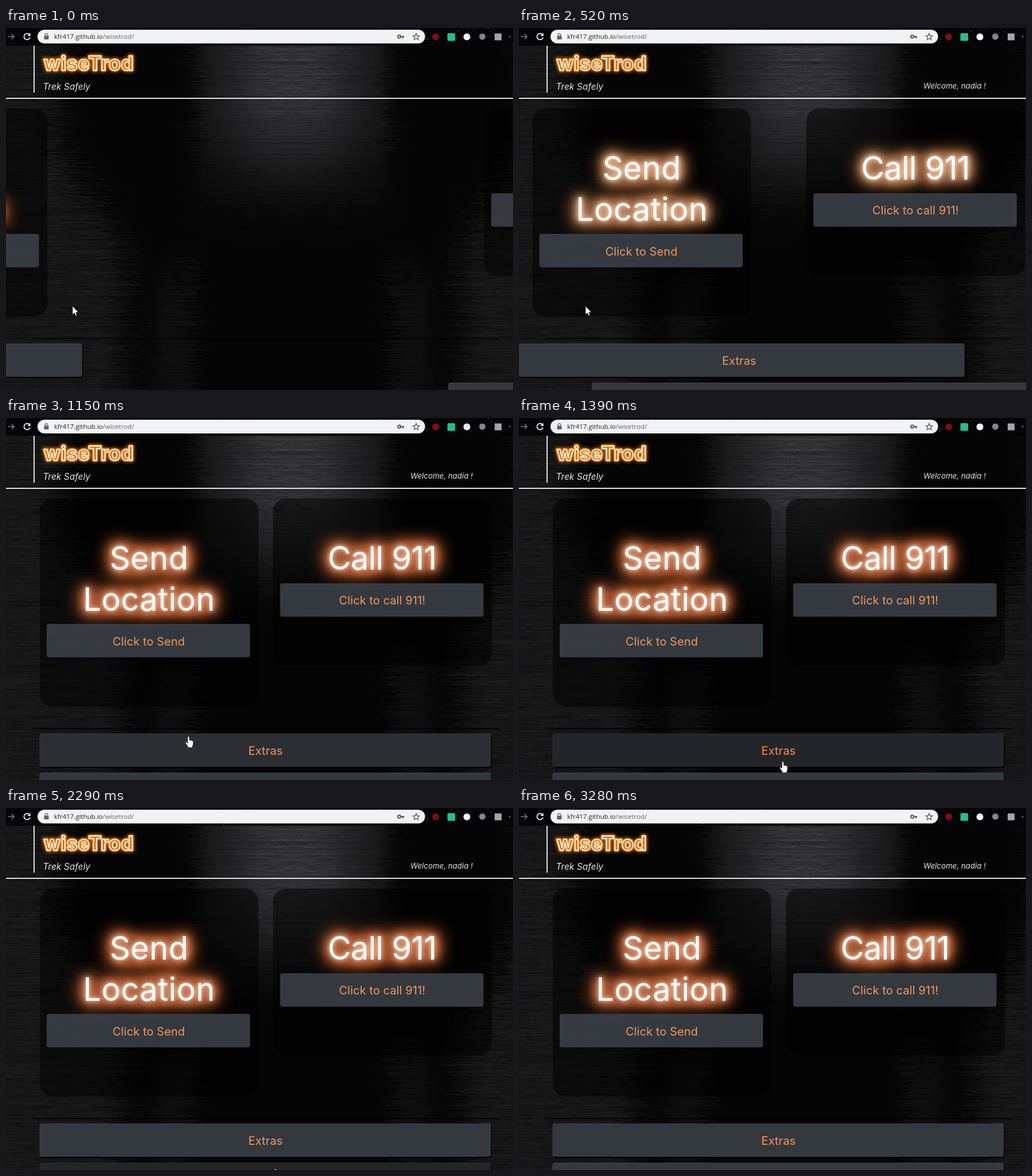
An HTML page with a canvas for the animation above (3380 ms loop, 885 by 633 pixels).

```html
<!DOCTYPE html>
<html lang="en">
<head>
<meta charset="utf-8">
<title>wiseTrod</title>
<style>
html, body { margin: 0; width: 100%; height: 100%; overflow: hidden; background: #050505; }
canvas, svg { position: absolute; left: 0; top: 0; width: 885px; height: 633px; display: block; }
text { font-family: Inter, sans-serif; font-optical-sizing: none; }
.big { font-size: 56px; letter-spacing: .3px; fill: #fff; text-anchor: middle; }
.tight { letter-spacing: -.7px; }
.btn { font-size: 20px; letter-spacing: .1px; fill: #f4965f; text-anchor: middle; }
.note { font-style: italic; fill: #e6e6e6; }
.logo { font-size: 34px; font-weight: 700; letter-spacing: .8px; stroke-linejoin: round; }
.url { font: 11.5px "Open Sans", sans-serif; fill: #202124; }
.box { fill: rgb(61,67,74); fill-opacity: .85; }
.card { fill: #000; fill-opacity: .52; }
</style>
</head>
<body>
<canvas id="metal" width="885" height="633"></canvas>
<svg viewBox="0 0 885 633" xmlns="http://www.w3.org/2000/svg">
  <defs>
    <filter id="neon" x="-.5" y="-1" width="2" height="3" color-interpolation-filters="sRGB">
      <feGaussianBlur in="SourceAlpha" stdDeviation="17"/>
      <feColorMatrix id="outer" result="a"/>
      <feGaussianBlur in="SourceAlpha" stdDeviation="9"/>
      <feColorMatrix id="mid" result="b"/>
      <feGaussianBlur in="SourceAlpha" stdDeviation="3.5"/>
      <feColorMatrix id="inner" result="c"/>
      <feMerge>
        <feMergeNode in="a"/><feMergeNode in="b"/><feMergeNode in="c"/><feMergeNode in="SourceGraphic"/>
      </feMerge>
    </filter>
    <filter id="soft" x="-.2" y="-.5" width="1.4" height="2"><feGaussianBlur stdDeviation="2.5"/></filter>
  </defs>

  <!-- browser bar -->
  <path d="M3 15H14M9.5 10.5L14 15L9.5 19.5" fill="none" stroke="#77787c" stroke-width="1.6"/>
  <path d="M41 11.5A5.4 5.4 0 1 0 42 16.5" fill="none" stroke="#f1f1f1" stroke-width="1.8"/>
  <path d="M42.6 8.6V14H37.2Z" fill="#f1f1f1"/>
  <rect x="55" y="3" width="676.5" height="24" rx="12" fill="#f1f2f5"/>
  <rect x="66.5" y="13.5" width="8" height="6.5" rx="1" fill="#5f6368"/>
  <path d="M68.2 14V12a2.3 2.3 0 0 1 4.6 0V14" fill="none" stroke="#5f6368" stroke-width="1.3"/>
  <text class="url" x="84" y="19.3">kfr417.github.io<tspan fill="#5f6368">/wisetrod/</tspan></text>
  <circle cx="686.5" cy="15" r="2.6" fill="none" stroke="#55585d" stroke-width="2"/>
  <path d="M689 15H695M693 15V18" stroke="#55585d" stroke-width="2.2"/>
  <path id="star" fill="none" stroke="#55585d" stroke-width="1.3"/>
  <circle cx="750" cy="15.5" r="6" fill="#7f0f13"/>
  <rect x="770.5" y="9" width="13.5" height="13.5" rx="2" fill="#21c08d"/>
  <circle cx="804.5" cy="15.5" r="6" fill="#f4f4f4"/>
  <circle cx="831.5" cy="15" r="5.5" fill="#858585"/>
  <rect x="853" y="9.5" width="12" height="12" fill="#a5a5a5"/>
  <circle cx="879" cy="15" r="1" fill="#c8c8c8"/>

  <!-- page header -->
  <path d="M49 31V113M0 123H885" stroke="#e2e2e2" stroke-width="2"/>
  <g class="logo">
    <text x="66" y="74" fill="#e07a18" stroke="#e07a18" stroke-width="7" opacity=".75" filter="url(#soft)">wiseTrod</text>
    <text x="66" y="74" fill="#b5651c" stroke="#e8862a" stroke-width="4.6">wiseTrod</text>
    <text x="66" y="74" fill="#c9762a" stroke="#fff0d6" stroke-width="2">wiseTrod</text>
  </g>
  <text class="note" x="64.5" y="108" font-size="15.2" letter-spacing=".15">Trek Safely</text>
  <text class="note" id="hello" x="706" y="106" font-size="13.3">Welcome, nadia !</text>

  <!-- sliding panels -->
  <g id="left">
    <rect class="card" x="59" y="141" width="381.5" height="363.5" rx="22"/>
    <g class="big" filter="url(#neon)"><text x="249.7" y="265">Send</text><text x="249.7" y="337">Location</text></g>
    <rect class="box" x="71" y="360" width="355" height="58.5" rx="4"/>
    <text class="btn" x="249.2" y="397.5">Click to Send</text>
  </g>
  <g id="right">
    <rect class="card" x="466" y="141" width="382" height="292.5" rx="22"/>
    <g class="big tight" filter="url(#neon)"><text x="656.5" y="265">Call 911</text></g>
    <rect class="box" x="478.5" y="289" width="355" height="58.5" rx="4"/>
    <text class="btn" x="656.7" y="326.3">Click to call 911!</text>
  </g>
  <path d="M46 543H860" stroke="#000" stroke-width="1.6"/>
  <g id="extras">
    <rect x="60" y="553.5" width="788" height="58.5" rx="4"/>
    <rect class="box" id="box1" x="58.5" y="551.5" width="788" height="58.5" rx="4"/>
    <text class="btn" id="label1" x="453" y="589.3">Extras</text>
  </g>
  <g id="next">
    <rect x="60" y="622" width="788" height="58.5" rx="4"/>
    <rect class="box" id="box2" x="58.5" y="620" width="788" height="58.5" rx="4"/>
  </g>

  <g id="cursor" fill="#fff" stroke="#111" stroke-width=".9" stroke-linejoin="round">
    <path id="arrow" d="M0 0V15.5L3.4 12.3L5.6 17.4L8.1 16.3L5.9 11.3H10.6Z"/>
    <path id="hand" d="M-1.6 1.4Q0 -1.2 1.7 1.4V7Q3 5.6 4.2 7.4Q5.6 6.2 6.6 8Q8 7.2 8.4 9.2V13.5Q8.2 16 7 17.5V20H-1V18Q-4.2 14.2 -5.8 10.6Q-4.6 8.6 -1.6 12Z"/>
  </g>
</svg>
<script>
const $ = id => document.getElementById(id);
const LOOP = 3380;
const STEPS = [0, 120, 240, 360, 520, 640, 760, 880, 1030, 1150, 1270, 1390, 1510, 1630, 1780,
  1900, 2020, 2140, 2290, 2420, 2570, 2710, 2860, 3010, 3130, 3280];
const clamp = v => Math.max(0, Math.min(1, v));
const ramp = (v, a, b) => clamp((v - a) / (b - a));
const smooth = (v, a, b) => { const k = ramp(v, a, b); return k * k * (3 - 2 * k); };

function random(seed) {
  return () => {
    seed = (seed + 0x6D2B79F5) | 0;
    let r = Math.imul(seed ^ (seed >>> 15), 1 | seed);
    r = (r + Math.imul(r ^ (r >>> 7), 61 | r)) ^ r;
    return ((r ^ (r >>> 14)) >>> 0) / 4294967296;
  };
}

// light on the metal, u = distance from the mirror axis
function light(u, y) {
  const fade = 1 - smooth(y, 110, 370);
  const centre = (24 + 24 * (1 - smooth(u, 30, 150))) * (1 - smooth(u, 140, 192)) * fade;
  const edge = 365 - 115 * smooth(y, 180, 420);
  const side = 19 * smooth(u, edge, edge + 95);
  const column = 10 * smooth(u, 160, 185) * (1 - smooth(u, 225, 260)) * smooth(y, 390, 480);
  return centre + side + column;
}

function paintMetal() {
  const W = 885, H = 633, AXIS = 500, rnd = random(11);
  const ctx = $("metal").getContext("2d"), img = ctx.createImageData(W, H);
  const put = (x, y, v) => {
    if (x < 0 || x >= W) return;
    const i = (y * W + x) * 4;
    img.data[i] = v; img.data[i + 1] = v; img.data[i + 2] = v * 1.05; img.data[i + 3] = 255;
  };
  for (let y = 31; y < H; y++) {
    let n = 0;
    const row = rnd() - .5;
    for (let u = 0; u <= AXIS; u++) {
      n = n * .95 + (rnd() - .5) * .3;
      const shine = light(u + n * 35 + row * 16, y + n * 60);
      const v = 5 + shine * Math.max(.1, .92 + n * .6 + row * .3);
      put(AXIS + u, y, v);
      put(AXIS - u, y, v);
    }
  }
  ctx.putImageData(img, 0, 0);
  ctx.fillStyle = "#050507";
  ctx.fillRect(0, 0, W, 31);
  for (let i = 0; i < 75; i++) {
    ctx.fillStyle = `rgba(205,215,240,${.25 + .65 * rnd()})`;
    ctx.fillRect(Math.floor(rnd() * W), Math.floor(rnd() * 31), 1, 1);
  }
}

// the CSS "ease" curve
function ease(p) {
  p = clamp(p);
  let lo = 0, hi = 1, s = .5;
  for (let i = 0; i < 24; i++) {
    s = (lo + hi) / 2;
    const x = .75 * s * (1 - s) + s * s * s;
    if (x < p) lo = s; else hi = s;
  }
  return .3 * s * (1 - s) * (1 - s) + 3 * s * s * (1 - s) + s * s * s;
}

// rows of [time, ...values], linear between rows
function along(rows, t) {
  let i = 0;
  while (i < rows.length - 2 && t >= rows[i + 1][0]) i++;
  const a = rows[i], b = rows[i + 1], k = ramp(t, a[0], b[0]);
  return a.slice(1).map((v, j) => v + (b[j + 1] - v) * k);
}

const PATH = [[880, 116, 486], [1030, 205, 520], [1270, 432, 593], [1390, 460.5, 600.5],
  [1630, 464, 612], [2290, 470.5, 631], [2420, 472, 642]];
// time, outer rgb, middle rgb, middle gain
const GLOW = [[0, 128, 62, 30, 205, 120, 85, 2.6], [240, 138, 64, 28, 205, 118, 84, 2.6],
  [520, 108, 66, 36, 205, 150, 112, 3.2], [760, 128, 74, 24, 212, 145, 86, 2.6],
  [1030, 136, 64, 28, 212, 130, 94, 2.6]];

function tint(id, [r, g, b], gain) {
  const row = v => "0 0 0 0 " + v / 255 + " ";
  $(id).setAttribute("values", row(r) + row(g) + row(b) + "0 0 0 " + gain + " 0");
}
function shift(id, x, y = 0) { $(id).setAttribute("transform", `translate(${x} ${y})`); }
function shade(id, k) {
  $(id).style.fill = `rgb(${61 - 21 * k},${67 - 22 * k},${74 - 24 * k})`;
}

function draw(time) {
  const t = STEPS.filter(s => s <= time).pop();
  const rest = 1 - ease(.1 + t / 955);
  shift("left", -407 * rest);
  shift("right", 407 * rest);
  shift("extras", -788 * rest);
  shift("next", 788 * rest);
  $("hello").style.display = t >= 120 ? "" : "none";

  const g = along(GLOW, t);
  tint("outer", g.slice(0, 3), 8);
  tint("mid", g.slice(3, 6), g[6]);
  tint("inner", [255, 230, 212], .9 + .08 * Math.sin(t / 190));

  const over = ramp(t, 1030, 1270) - ramp(t, 1510, 1630);
  shade("box1", over);
  shade("box2", ramp(t, 1630, 1780) - ramp(t, 2420, 2570));
  $("label1").style.fill = over > .5 ? "#ff8c4c" : "";

  const [x, y] = along(PATH, t);
  shift("cursor", x, y);
  $("arrow").style.display = y > 552 ? "none" : "";
  $("hand").style.display = y > 552 ? "" : "none";
}

$("star").setAttribute("d", "M" + Array.from({ length: 10 }, (_, i) => {
  const r = i % 2 ? 2.7 : 6, a = i * Math.PI / 5;
  return (716 + r * Math.sin(a)).toFixed(2) + " " + (15.5 - r * Math.cos(a)).toFixed(2);
}).join("L") + "Z");
paintMetal();
const start = performance.now();
function tick() {
  draw((performance.now() - start) % LOOP);
  requestAnimationFrame(tick);
}
tick();
</script>
</body>
</html>
```
